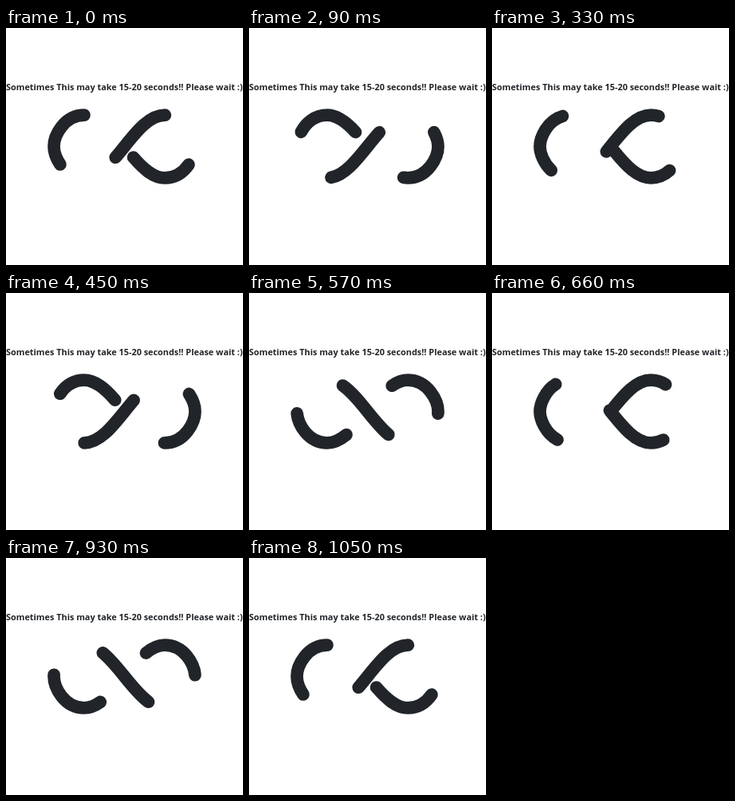
These frames come from a looping animation (297x297 px, 1080 ms). An HTML page:

```html
<!DOCTYPE html>
<html lang="en">
<head>
<meta charset="utf-8">
<title>Please wait</title>
<style>
  html, body { margin: 0; height: 100%; overflow: hidden; background: #fff; }
  svg { display: block; width: 100%; height: 100%; }
  text { font: bold 10.88px "Open Sans", "Noto Sans", sans-serif; fill: #212529; }
  path { fill: none; stroke: #212529; stroke-width: 8; stroke-linecap: round; }
</style>
</head>
<body>
<svg viewBox="0 0 297 297">
  <text x="0" y="78">Sometimes This may take 15-20 seconds!! Please wait :)</text>
  <path id="loop" transform="translate(148.5 148.5) scale(1.966) translate(-50 -50)"
    d="M24.3 30C11.4 30 5 43.3 5 50s6.4 20 19.3 20c19.3 0 32.1-40 51.4-40C88.6 30 95 43.3 95 50s-6.4 20-19.3 20C56.4 70 43.6 30 24.3 30z"/>
</svg>
<script>
  const STEP = 30, STEPS = 36;
  const loop = document.getElementById("loop");
  const length = loop.getTotalLength();
  loop.style.strokeDasharray = length / 6;

  // The dashes travel the whole path in STEPS - 1 steps, so the last pose equals the first.
  function draw(now) {
    const step = Math.floor(now / STEP) % STEPS;
    loop.style.strokeDashoffset = length * step / (STEPS - 1);
    requestAnimationFrame(() => draw(performance.now() - start));
  }
  const start = performance.now();
  draw(0);
</script>
</body>
</html>
```
